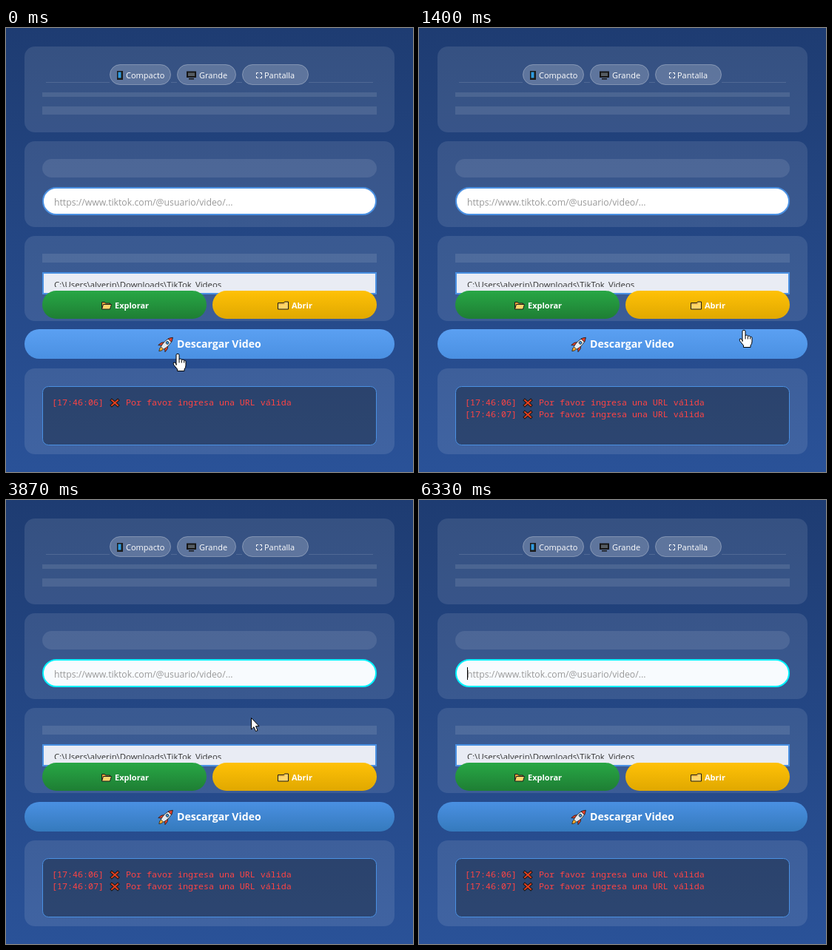
Recreate the animation shown at these times as an HTML page. Size 550x600 px, loop 6470 ms.

```html
<!DOCTYPE html>
<html lang="es">
<head>
<meta charset="utf-8">
<title>Descargar Video</title>
<style>
  html, body { margin: 0; width: 100%; height: 100%; overflow: hidden; background: #1e3c72; }
  svg { display: block; width: 100vw; height: 100vh; }
  text { font-family: "Open Sans", "Noto Sans", sans-serif; font-size: 11px; fill: #fff; white-space: pre; }
  .bold text { font-weight: bold; }
  .veil rect { fill: #fff; fill-opacity: .1; }
  .chips rect { fill: #fff; fill-opacity: .2; stroke: #fff; stroke-opacity: .3; }
  .log text { font-family: "Noto Sans Mono", "DejaVu Sans Mono", monospace; font-size: 11.67px; fill: #ff4444; }
  .cursor path { fill: #fff; stroke: #000; stroke-linejoin: round; }
</style>
</head>
<body>
<svg viewBox="0 0 550 600">
  <defs>
    <linearGradient id="sky" x2="0" y2="1"><stop stop-color="#1e3c72"/><stop offset="1" stop-color="#2a5298"/></linearGradient>
    <linearGradient id="blue" x2="0" y2="1"><stop stop-color="#4a90e2"/><stop offset="1" stop-color="#357abd"/></linearGradient>
    <linearGradient id="blueHover" x2="0" y2="1"><stop stop-color="#5ba0f2"/><stop offset="1" stop-color="#4a90e2"/></linearGradient>
    <linearGradient id="green" x2="0" y2="1"><stop stop-color="#28a745"/><stop offset="1" stop-color="#1e7e34"/></linearGradient>
    <linearGradient id="gold" x2="0" y2="1"><stop stop-color="#ffc107"/><stop offset="1" stop-color="#e0a800"/></linearGradient>
    <linearGradient id="goldHover" x2="0" y2="1"><stop stop-color="#ffcd39"/><stop offset="1" stop-color="#ffc107"/></linearGradient>
    <clipPath id="pathClip"><rect x="60" y="332" width="430" height="18"/></clipPath>
    <g id="cross" fill="none" stroke-linecap="square">
      <path d="M2 2 10 9M10 2 2 9" stroke="#1a1a1a" stroke-width="4"/>
      <path d="M2 2 10 9M10 2 2 9" stroke="#e8401f" stroke-width="1.9"/>
    </g>
  </defs>

  <rect width="550" height="600" fill="url(#sky)"/>
  <g class="veil">
    <rect x="25" y="25" width="500" height="116" rx="14"/>
    <rect x="25" y="153" width="500" height="116" rx="14"/>
    <rect x="25" y="281" width="500" height="115" rx="14"/>
    <rect x="25" y="460" width="500" height="116" rx="14"/>
    <rect x="49" y="87" width="452" height="6"/>
    <rect x="49" y="106" width="452" height="11"/>
    <rect x="49" y="177" width="452" height="25" rx="12.5"/>
    <rect x="49" y="305" width="452" height="12"/>
  </g>
  <path d="M54 73.5h86M223 73.5h8M311 73.5h8M409 73.5h87" stroke="#fff" stroke-opacity=".13"/>

  <g class="chips">
    <rect x="140.5" y="49.5" width="82" height="27" rx="13.5"/>
    <rect x="231.5" y="49.5" width="79" height="27" rx="13.5"/>
    <rect x="319.5" y="49.5" width="89" height="27" rx="13.5"/>
    <text x="162" y="68">Compacto</text>
    <text x="261" y="68">Grande</text>
    <text x="349" y="68">Pantalla</text>
  </g>
  <path d="M150 58h8v12h-8z" fill="#1c1c1c"/>
  <path d="M151.5 59.500h4v8h-4z" fill="#2f9be0"/>
  <path d="M244 58.500h13v8.500h-13zM247 68h7v1.500h-7z" fill="#161616"/>
  <path d="M246 60.500h9v4.500h-9z" fill="#555c62"/>
  <path d="M338.500 63v-2.500h2.500M343 60.500h2.500v2.500M345.500 65v2.500h-2.500M341 67.500h-2.500v-2.500" fill="none" stroke="#fff"/>

  <rect id="field" x="50" y="216" width="450" height="36" rx="18" stroke-width="2"/>
  <text x="65" y="240" style="font-size:12.25px;fill:#999">https://www.tiktok.com/@usuario/video/...</text>
  <rect id="caret" x="65" y="226" width="1" height="17"/>

  <rect x="50" y="331" width="450" height="28" fill="#e9ecf4" stroke="#4a90e2" stroke-width="2"/>
  <g clip-path="url(#pathClip)">
    <text x="65" y="350.5" style="font-size:11.4px;fill:#333">C:\Users\alverin\Downloads\TikTok_Videos</text>
  </g>

  <g class="bold">
    <rect x="49" y="355" width="222" height="38" rx="19" fill="url(#green)"/>
    <rect id="open" x="279" y="355" width="222" height="38" rx="19"/>
    <text x="147" y="379">Explorar</text>
    <text x="386" y="379">Abrir</text>
    <g stroke="#1b1b1b" stroke-linejoin="round">
      <path d="M129.500 380v-9.500h4l1 1.500h6v2" fill="#e8a33a"/>
      <path d="M129.500 380l2-6.500h11l-2 6.500z" fill="#ffd66b"/>
      <path d="M367.500 380v-8.500h8l1-1.500h5v10z" fill="#ffd66b"/>
      <path d="M368 373h8l1-1" fill="none" stroke="#e8a33a"/>
    </g>
    <g id="download">
      <rect id="downloadFace" x="25" y="408" width="500" height="40" rx="20"/>
      <text x="231" y="433" style="font-size:14.1px">Descargar Video</text>
      <g transform="translate(216 428.500) rotate(45)" stroke="#222" stroke-width=".8" stroke-linejoin="round">
        <path d="M-2 6Q-3 10 0 13Q3 10 2 6Z" fill="#ffb02e"/>
        <path d="M-3-1Q-7 2-6.500 8L-3 5ZM3-1Q7 2 6.500 8L3 5Z" fill="#e8402a"/>
        <path d="M0-13Q-4-8-3.800-2Q-3.700 3-2.500 7H2.500Q3.700 3 3.800-2Q4-8 0-13Z" fill="#e4e9ee"/>
        <path d="M0-13Q-2.400-10-3.200-7.500H3.200Q2.400-10 0-13Z" fill="#e8402a"/>
        <circle cy="-3" r="1.900" fill="#3a96dd"/>
      </g>
    </g>
  </g>

  <rect x="49.5" y="484.500" width="451" height="79" rx="8" fill="#000" fill-opacity=".3" stroke="#4a90e2"/>
  <g class="log">
    <g>
      <text x="62" y="510">[17:46:06]</text>
      <use href="#cross" x="141" y="501"/>
      <text x="162" y="510">Por favor ingresa una URL válida</text>
    </g>
    <g id="secondLog">
      <text x="62" y="526">[17:46:07]</text>
      <use href="#cross" x="141" y="517"/>
      <text x="162" y="526">Por favor ingresa una URL válida</text>
    </g>
  </g>

  <g class="cursor" id="pointer">
    <g id="hand">
      <path d="M-2 14.500V.8Q-2-.7 0-.7T2 .8V7Q2 6 3.500 6T5.400 7.500Q6 7 7 7T8.600 8.500Q9 8 10 8.200T11 10V15Q11 18 9 20V22.500H-.5V20L-5 14.500Q-6.500 12-5.300 11T-2 13Z"/>
      <path d="M2 7V11.500M5.400 8V11.500M8.600 9V11.500" style="fill:none"/>
    </g>
    <path id="arrow" d="M.5.500V16L4 12.700 6.500 18.500 9 17.500 6.500 11.700H11Z"/>
    <path id="beam" d="M-3-7.500H0L.5-7 1-7.500H4M.5-7V7M-3 7.500H0L.5 7 1 7.500H4" style="fill:none"/>
  </g>
</svg>
<script>
const LOOP = 6470, STEP = 200 / 3;
const FOCUS = 2730, PRESS = 730, RELEASE = 1000;

// Pointer hotspot: time, x, y
const route = [
  [0, 232, 441], [600, 379, 427], [670, 392, 427], [1200, 392, 427],
  [1400, 439, 409], [1600, 491, 376], [1800, 491, 376], [2470, 191, 252],
  [2670, 167, 234], [2870, 167, 234], [3530, 331, 294], [3870, 331, 294],
  [4470, 472, 228], [4600, 476, 223], [5130, 270, 491], [5330, 205, 610]
];
const el = id => document.getElementById(id);
const show = (id, on) => el(id).style.display = on ? "" : "none";
const paint = (id, fill) => el(id).setAttribute("fill", fill);
const move = (id, x, y) => el(id).setAttribute("transform", `translate(${x} ${y})`);

function pointerAt(t) {
  const next = route.findIndex(point => point[0] > t);
  if (next < 0) return route[route.length - 1].slice(1);
  if (next === 0) return route[0].slice(1);
  const [t0, x0, y0] = route[next - 1], [t1, x1, y1] = route[next];
  const p = (t - t0) / (t1 - t0);
  return [Math.round(x0 + (x1 - x0) * p), Math.round(y0 + (y1 - y0) * p)];
}

const inside = ([x, y], left, top, right, bottom) =>
  x >= left && x < right && y >= top && y < bottom;
const overDownload = spot => inside(spot, 25, 407, 525, 448);

function draw(t) {
  const spot = pointerAt(t);
  const hoverDownload = overDownload(spot);
  const hoverOpen = inside(spot, 279, 355, 501, 393);
  const hoverExplore = inside(spot, 49, 355, 271, 393);
  const overText = inside(spot, 49, 215, 501, 253) || inside(spot, 49, 330, 501, 355);
  const kind = hoverDownload || hoverOpen || hoverExplore ? "hand" : overText ? "beam" : "arrow";
  for (const id of ["hand", "beam", "arrow"]) show(id, id === kind);
  move("pointer", ...spot);

  // The raised button settles a moment after the pointer leaves it.
  const pressed = t >= PRESS && t < RELEASE;
  const raised = !pressed && (hoverDownload || overDownload(pointerAt(Math.max(0, t - 130))));
  move("download", 0, raised ? -1 : 0);
  paint("downloadFace", hoverDownload ? "url(#blueHover)" : "url(#blue)");
  paint("open", hoverOpen ? "url(#goldHover)" : "url(#gold)");

  const focused = t >= FOCUS;
  paint("field", focused ? "#f8fbfe" : "#fff");
  el("field").setAttribute("stroke", focused ? "#00f2fe" : "#4a90e2");
  show("caret", focused && Math.floor((t - FOCUS) / 200) % 2 === 0);
  show("secondLog", t >= RELEASE);
}

function tick() {
  const frame = Math.floor((performance.now() % LOOP + 3.4) / STEP);
  draw(Math.round(frame * STEP / 10) * 10);
  requestAnimationFrame(tick);
}
tick();
</script>
</body>
</html>
```
